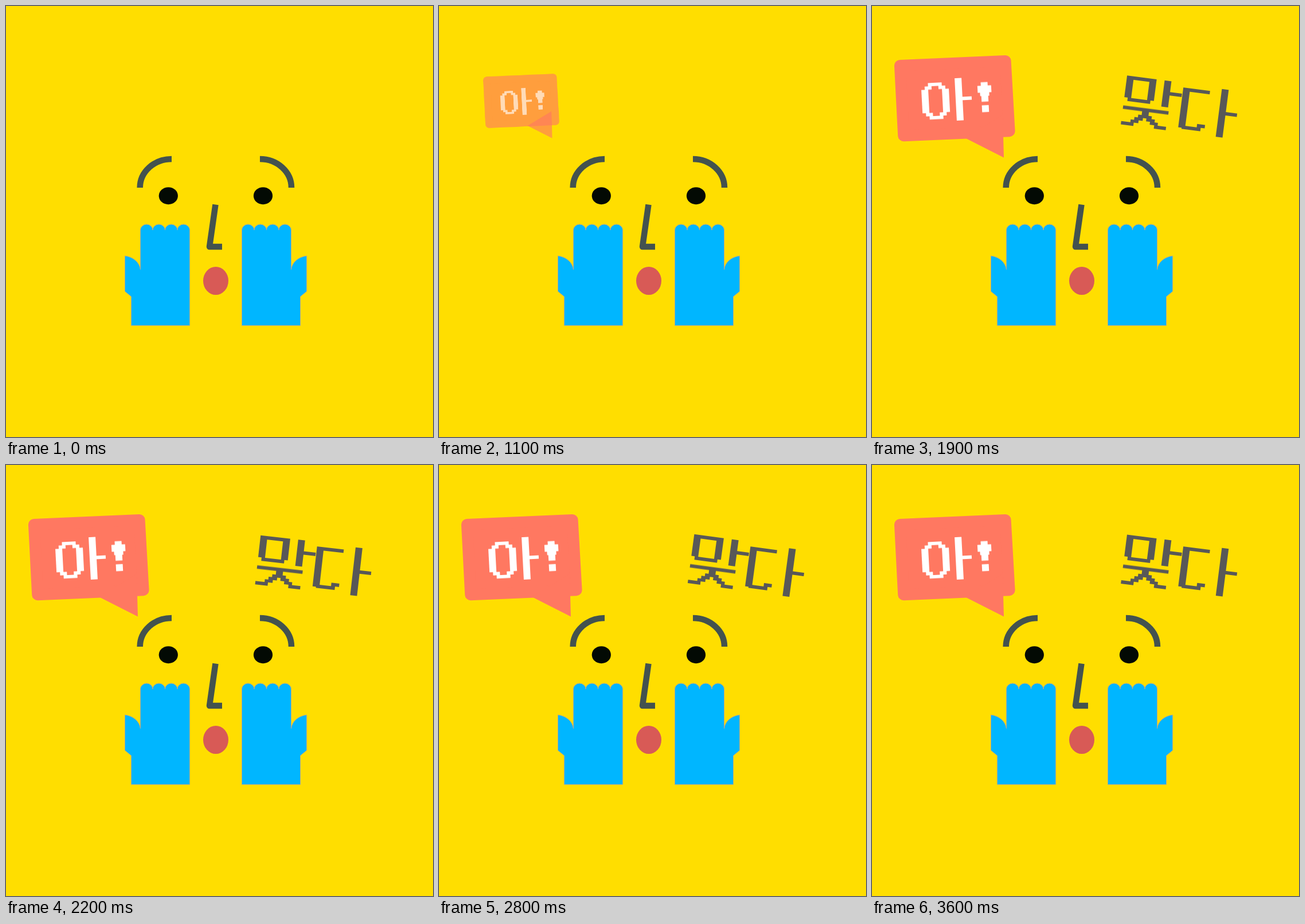
These frames come from a looping animation (745 px wide and 752 px high, 3700 ms). An HTML page:

```html
<!DOCTYPE html>
<html lang="ko">
<head>
<meta charset="utf-8">
<title>아! 맞다</title>
<style>
  html, body { margin: 0; width: 100%; height: 100%; overflow: hidden; background: #ffde00; }
  svg { display: block; width: 100%; height: 100%; }

  .line { fill: none; stroke: #43524f; stroke-width: 10.5; stroke-linejoin: round; }
  .eye { fill: #030a04; }
  .mouth { fill: #d85a56; }
  .hand { fill: #00b6ff; stroke: #b0a994; stroke-width: 1; }

  .bubble { transform-origin: 142px 173px; animation: grow 3.7s infinite; }
  .bubble > * { animation: fade 3.7s infinite; }
  .body { fill: #ff7861; stroke: #ff7861; stroke-width: 20; stroke-linejoin: round; }
  .tail { fill: #ff7861; }
  .ah { fill: #fff; }
  .right { fill: #585858; animation: sway 3.7s infinite; }

  /* Motion advances in 100 ms steps. */
  @keyframes grow {
    0%, 24.32% { transform: scale(.26); animation-timing-function: steps(4, end); }
    35.13%, 100% { transform: scale(1); }
  }
  @keyframes fade {
    0% { opacity: 0; animation-timing-function: steps(1, end); }
    24.32% { opacity: .26; animation-timing-function: steps(4, end); }
    35.13%, 100% { opacity: 1; }
  }
  @keyframes sway {
    0% { opacity: 0; transform: translate(540px, 175px) rotate(7.4deg); animation-timing-function: steps(1, end); }
    51.35% { opacity: 1; transform: translate(540px, 175px) rotate(7.4deg); animation-timing-function: steps(3, end); }
    59.45% { opacity: 1; transform: translate(540px, 175px) rotate(6.5deg); }
    62.16% { opacity: 1; transform: translate(540px, 175px) rotate(6.5deg); animation-timing-function: steps(5, end); }
    75.67% { opacity: 1; transform: translate(540px, 175px) rotate(7.7deg); animation-timing-function: steps(4, end); }
    86.48% { opacity: 1; transform: translate(540px, 175px) rotate(6.5deg); animation-timing-function: steps(5, end); }
    100% { opacity: 1; transform: translate(540px, 175px) rotate(7.45deg); }
  }
</style>
</head>
<body>
<svg viewBox="0 0 745 752" preserveAspectRatio="none">
  <defs>
    <path id="hand" class="hand" d="M218.5 557.5V507L207.5 498V436C222 438 233 447 234.5 460V391
      a10.75 10 0 0 1 21.5 0a10.75 10 0 0 1 21.5 0a10.75 10 0 0 1 21.5 0a10.75 10 0 0 1 21.5 0V557.5Z"/>
  </defs>

  <g class="line">
    <path d="M233.7 317A55.3 50 0 0 1 289 267"/>
    <path d="M443 267A55 50 0 0 1 498 317"/>
    <path d="M365.5 346.5L355 420H377"/>
  </g>
  <ellipse class="eye" cx="283.3" cy="331.2" rx="16.6" ry="15"/>
  <ellipse class="eye" cx="448.5" cy="331.2" rx="16.6" ry="15"/>
  <ellipse class="mouth" cx="366" cy="479.5" rx="22" ry="24.5"/>
  <use href="#hand"/>
  <use href="#hand" transform="translate(732) scale(-1 1)"/>

  <g class="bubble">
    <path class="body" d="M48.9 103.9L232.6 96L239.6 218.2L55.2 226.2Z"/>
    <path class="tail" d="M162 230L228 190L230 264.5Z"/>
    <g class="ah" role="img" aria-label="아!">
      <g transform="rotate(-3 146 163)">
        <path fill-rule="evenodd" transform="translate(87 132) scale(6 5.8)"
          d="M2 0H6V1H7V2H8V9H7V10H6V11H2V10H1V9H0V2H1V1H2Z M3 1H5V2H6V9H5V10H3V9H2V2H3Z"/>
        <path d="M146 126h12v33h16v6h-16v35h-12z"/>
        <path d="M191 135.5h12v6h6v12h-4v6h-2v10h-12v-10h-2v-6h-4v-12h6z M191 175.7h12v12h-12z"/>
      </g>
    </g>
  </g>

  <g class="right" role="img" aria-label="맞다">
    <path fill-rule="evenodd" d="M-101-41H-49V-3H-55V3H-95V-3H-101Z M-89-35H-61V-3H-89Z"/>
    <path d="M-35-41h12v19h21v6h-21v21h-12z"/>
    <path d="M-101 11.5H-21V17.5H-55V24H-49V29H-43V34H-37V39H-22V45H-43V39H-51V34H-58V29H-64V34H-71V39H-79V45H-101V39H-85V34H-79V29H-73V24H-67V17.5H-101Z"/>
    <path d="M-1-33H46V-27H11V33H31V27H45V33H38V39H5V37H-1Z"/>
    <path d="M66-39h12v39h20v6h-20v39h-12z"/>
  </g>
</svg>
</body>
</html>
```
